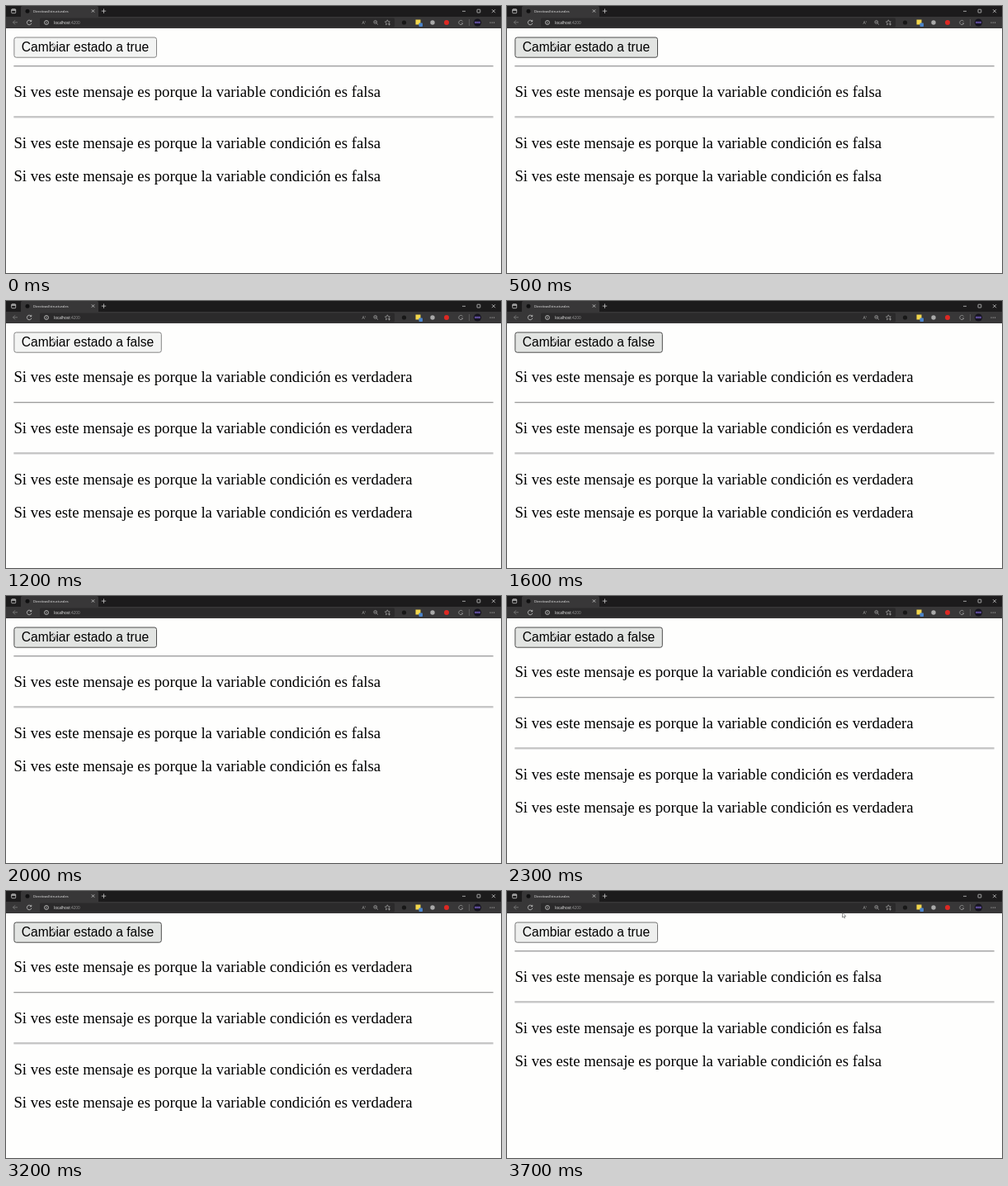
These frames come from a looping animation (600 px wide and 323 px high, 3.8 s). An HTML page:

```html
<!DOCTYPE html>
<html lang="es">
<head>
<meta charset="utf-8">
<style>
html, body { margin: 0; width: 100%; height: 100%; overflow: hidden; background: #fefefd; }
svg { display: block; width: 600px; height: 323px; }
text { white-space: pre; }
.ui { font-family: "Open Sans", "Noto Sans", sans-serif; }
.label { font: 15.6px "Liberation Sans", Arial, sans-serif; }
.row { font: 18.75px "Liberation Serif", "Times New Roman", serif; }
.icon { fill: none; stroke: #ddd; stroke-width: .7; }
.dim { stroke: #888; }
</style>
</head>
<body>
<svg viewBox="0 0 600 323">
  <rect width="600" height="323" fill="#fefefd"/>

  <!-- browser window -->
  <rect width="600" height="14" fill="#1c1b1c"/>
  <rect y="13" width="600" height="14" fill="#383738"/>
  <path d="M18 13V2q0-2 2-2H110q2 0 2 2V13z" fill="#383738"/>
  <rect x="41" y="14.5" width="430" height="11" rx="1.5" fill="#2b2a2b"/>
  <g class="icon">
    <rect x="6.7" y="3.7" width="5" height="5" rx=".8"/>
    <path d="M6.7 5H11.7" stroke-width="1.2"/>
    <path d="M103.8 4.3l3.4 3.4m0-3.4l-3.4 3.4M118.5 3.4v5.4m-2.7-2.7h5.4"/>
    <path d="M553 6.3h4M589 4.2l4 4m0-4l-4 4"/>
    <rect x="571" y="4.2" width="3.8" height="3.8" rx=".5"/>
    <path class="dim" d="M14 19.8H8.5m2.6-2.6l-2.6 2.6 2.6 2.6"/>
    <path d="M30.5 18.4a2.8 2.8 0 1 0 .4 2.3M30.8 16.8v1.9h-1.9"/>
    <circle cx="49" cy="20" r="2.5"/>
    <path d="M49 19.6v1.6m0-2.9v.6"/>
    <g stroke="#aaa">
      <circle cx="447.7" cy="19.4" r="1.9"/>
      <path d="M449.1 20.8l1.9 1.9M446.7 19.4h2"/>
      <path d="M462.3 16.8l.9 1.9 2.1.3-1.6 1.5M462.3 16.8l-.9 1.9-2 .3 1.5 1.5-.4 2.2 1.8-1M463 22h3m-1.5-1.5v3"/>
      <path d="M553.5 18.5a2.6 2.6 0 1 0 .3 2.4h-2"/>
    </g>
    <path stroke="#666" d="M561.5 16v8"/>
  </g>
  <circle cx="26" cy="6.2" r="2.5" fill="#0f0f10"/>
  <circle cx="482.5" cy="20" r="2.6" fill="#171717"/>
  <rect x="496.5" y="16.5" width="6" height="6" fill="#f2d64b"/>
  <rect x="500.5" y="20.5" width="4.5" height="4.5" rx=".8" fill="#4b83c9"/>
  <circle cx="517" cy="20" r="2.7" fill="#a9a9a9"/>
  <circle cx="534" cy="20" r="3" fill="#dc2823"/>
  <circle cx="571.5" cy="20" r="4.6" fill="#15131f"/>
  <rect x="568" y="18.7" width="7" height="2.4" fill="#5b4a94"/>
  <g fill="#ccc">
    <circle cx="587" cy="20" r=".6"/><circle cx="589.3" cy="20" r=".6"/><circle cx="591.6" cy="20" r=".6"/>
  </g>
  <g class="ui">
    <text x="33" y="7.9" font-size="4" fill="#eee">DirectivasEstructurales</text>
    <text x="58" y="21.8" font-size="4.7" fill="#f4f4f4">localhost<tspan fill="#999">:4200</tspan></text>
    <text x="431.5" y="21.8" font-size="5.2" fill="#aaa">A<tspan font-size="3" dy="-2">»</tspan></text>
  </g>

  <!-- page -->
  <rect id="button" x="9.9" y="38" height="24.2" rx="2.5"/>
  <text id="label" class="label" x="18.8" y="55.4"></text>
  <g id="content"></g>
  <path id="cursor" d="M0 0V6L1.4 4.8 2.3 6.8 3.2 6.4 2.4 4.5H4.2z" fill="#fff" stroke="#333" stroke-width=".5"/>
</svg>
<script>
const LOOP = 3800, STEP = 100, LEAVE = 3400, STOP = 3700;
const clicks = [100, 500, 900, 1300, 1600, 2000, 2300, 2700, 3000, 3400];
const fills = {
  active: ["#f3f4f3", "#858585"],
  hover: ["#e2e4e2", "#4c4c4c"],
  idle: ["#eeefee", "#767676"]
};
const $ = id => document.getElementById(id);

const rule = y => `<rect x="9.4" y="${y}" width="581.2" height="2" fill="#eee"/>
  <path d="M9.4 ${y + .5}H590.6" stroke="#999"/>
  <path d="M9.4 ${y + 1.7}H590.6" stroke="#d6d6d6" stroke-width=".6"/>`;

function page(on) {
  const word = on ? "verdadera" : "falsa";
  const rows = on ? [98.2, 160, 221.8, 262.4] : [110, 171.8, 212.4];
  const rules = on ? [122, 183.5] : [72, 133.5];
  return rules.map(rule).join("") + rows.map(y =>
    `<text class="row" x="9.4" y="${y}">Si ves este mensaje es porque la variable condición es ${word}</text>`
  ).join("");
}

const pages = [page(false), page(true)];
let shown = -1;

function draw(now) {
  const t = Math.floor(now % LOOP / STEP) * STEP;
  const on = clicks.filter(c => c <= t).length % 2;
  if (on !== shown) {
    shown = on;
    $("content").innerHTML = pages[on];
    $("label").textContent = "Cambiar estado a " + (on ? "false" : "true");
    $("button").setAttribute("width", on ? 178.4 : 172.6);
  }

  const p = Math.min(1, Math.max(0, (t - LEAVE) / (STOP - LEAVE)));
  const x = 57 + 349.5 * p, y = 44.8 - 18.8 * p;
  $("cursor").setAttribute("transform", `translate(${x} ${y})`);

  const pressed = clicks.some(c => c - t > 0 && c - t <= STEP);
  const [fill, stroke] = fills[p > 0 ? "idle" : pressed ? "active" : "hover"];
  $("button").setAttribute("fill", fill);
  $("button").setAttribute("stroke", stroke);
}

function tick() {
  draw(performance.now());
  requestAnimationFrame(tick);
}
tick();
</script>
</body>
</html>
```
